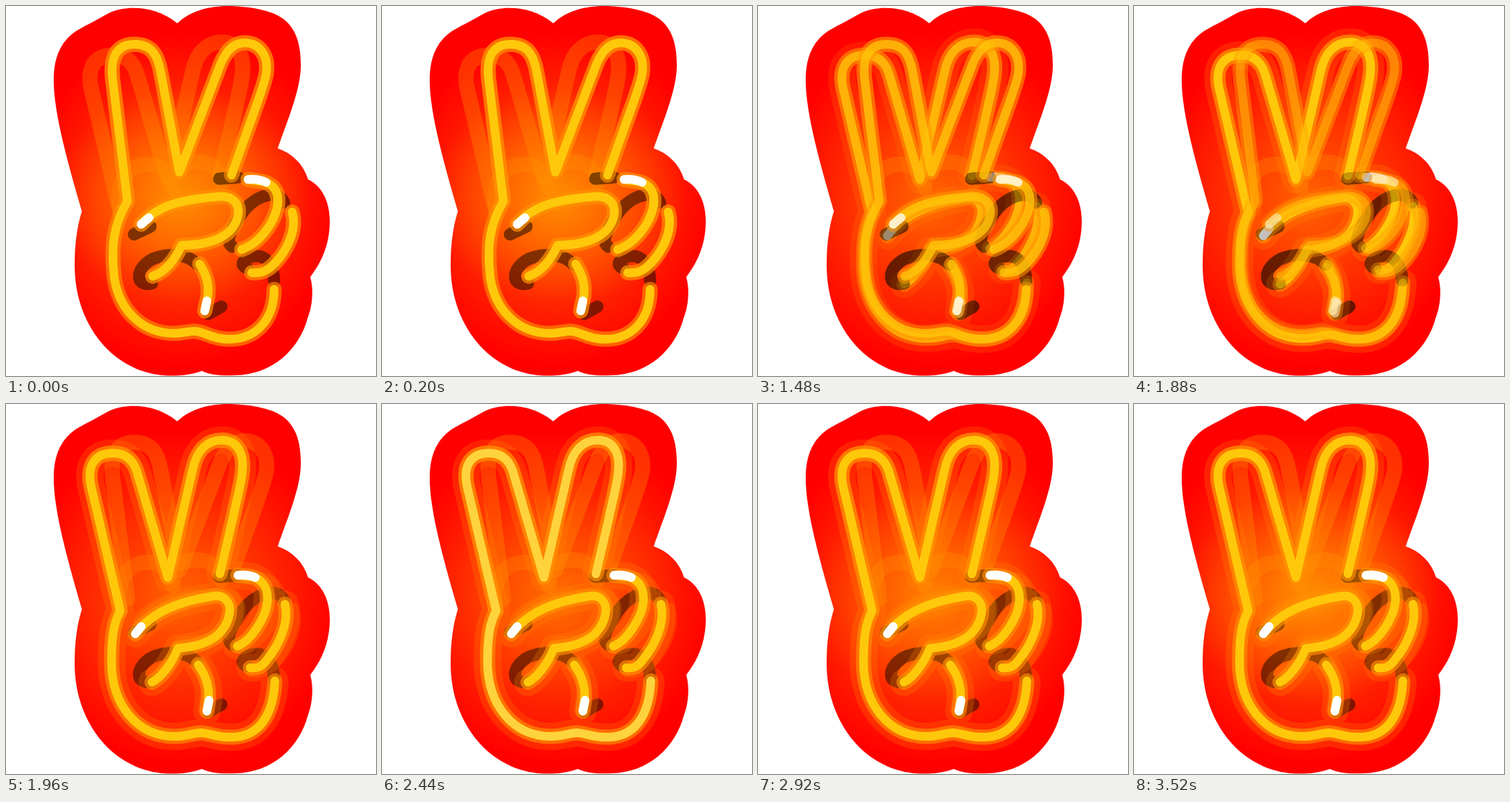
An HTML page with a canvas for the animation above (3600 ms loop, 512x512 px).

```html
<!DOCTYPE html>
<html lang="en">
<head>
<meta charset="utf-8">
<title>Neon hand</title>
<style>
  html, body { margin: 0; width: 100%; height: 100%; overflow: hidden; background: #fff; }
  canvas { display: block; width: 512px; height: 512px; }
</style>
</head>
<body>
<canvas id="stage" width="512" height="512"></canvas>
<script>
const ctx = document.getElementById('stage').getContext('2d');
const LOOP = 3600, STEP = 40;
ctx.lineCap = ctx.lineJoin = 'round';

const join = (...paths) => {
  const all = new Path2D();
  paths.forEach(p => all.addPath(p));
  return all;
};

const glass = new Path2D(`M237 24 C255 7 279 0 310 0 C345 1 371 8 384 18
  C402 32 408 54 408 82 C408 115 390 157 376 197 C396 204 411 218 418 240
  C437 249 448 270 448 298 C448 328 438 353 421 375 C426 391 424 415 418 430
  C406 476 368 510 318 511 C300 512 283 511 271 505 C253 512 227 513 209 510
  C144 500 95 438 95 359 C95 331 98 306 105 284 C87 222 66 149 66 103
  C66 68 78 47 98 34 C114 25 128 18 142 10 C168 -2 208 0 237 24Z`);

// Tubes that stay dark between the lit parts.
const darkTubes = new Path2D(`M295 239 L321 237 M385 272 C374 250 340 265 325 289
  C315 305 302 326 313 333 M371 380 C370 354 357 345 345 346 C332 347 320 358 334 363
  M177 316 L200 305 M202 384 C177 389 179 362 203 350 C226 341 252 343 265 358
  M280 426 L298 416`);

const wideFingers = new Path2D(`M168 270 L148 105 C143 68 155 53 178 53
  C202 53 210 69 214 91 L240 230 L297 80 C306 59 317 51 330 51
  C351 51 364 69 360 94 C357 110 349 130 342 150 L312 234`);
const wide = {
  outline: join(wideFingers, new Path2D(`M371 392 C371 435 345 462 307 461
    C284 461 274 450 261 450 C250 450 246 453 233 453 C188 453 157 421 150 377
    C145 335 148 304 168 270`)),
  details: new Path2D(`M187 302 C211 275 244 268 291 264 C314 261 324 274 321 290
    C316 315 290 331 243 331 C234 351 222 367 203 374
    M268 357 C279 374 282 392 278 408 L275 422
    M335 240 L355 243 C382 249 380 276 367 300 C354 322 340 332 326 337
    M396 285 C403 309 390 338 370 358 C360 368 351 370 340 369`),
  shine: new Path2D('M187 302 L198 293 M278 408 L275 422 M335 240 C344 239 352 240 360 244')
};

const palm = new Path2D(`M372 383 C370 431 350 460 314 461 C292 462 281 455 270 455
  C259 455 251 460 234 460 C180 460 147 415 146 359 C146 321 149 304 158 286`);
const narrowFingers = new Path2D(`M158 286 L118 115 C111 84 124 68 148 68
  C166 68 176 78 181 93 L224 240 L258 92 C264 62 280 50 299 50
  C320 50 330 68 327 94 C325 113 318 138 314 158 L296 235`);
const fistFingers = new Path2D(`M158 286 C150 246 169 219 196 219 C216 219 228 232 231 252
  M240 221 C270 209 295 218 298 244`);
const narrowDetails = new Path2D(`M179 318 C203 287 240 273 286 266 C304 263 312 277 309 291
  C304 317 282 335 238 338 C229 360 215 378 202 385
  M266 361 C277 376 282 394 280 410 L278 425
  M321 237 L341 239 C366 246 367 276 352 302 C341 321 331 331 320 335
  M386 277 C392 302 379 332 361 354 C353 365 346 366 338 365`);
const narrowShine = new Path2D('M179 318 L187 308 M281 410 L278 425 M321 237 C330 236 338 237 345 240');

const narrow = { outline: join(palm, narrowFingers), details: narrowDetails, shine: narrowShine, halo: true };
const fist = {
  outline: join(palm, fistFingers), details: narrowDetails, halo: true,
  shine: join(narrowShine, new Path2D('M230 247 L231 252'))
};
for (const pose of [wide, narrow, fist]) pose.all = join(pose.outline, pose.details);

const clamp = x => Math.max(0, Math.min(1, x));
// Fades in around `from` and out around `to`; neighbours overlap while both stay bright.
const lit = (t, from, to) => clamp((t - from + 100) / 130) * clamp((to + 100 - t) / 130);

function stroke(path, width, color, alpha = 1) {
  ctx.globalAlpha = alpha;
  ctx.lineWidth = width;
  ctx.strokeStyle = color;
  ctx.stroke(path);
}

function drawSpot(x, y, rx, ry, inner, outer, alpha) {
  const fill = ctx.createRadialGradient(0, 0, 0, 0, 0, 1);
  fill.addColorStop(0, inner);
  fill.addColorStop(1, outer);
  ctx.save();
  ctx.globalAlpha = alpha;
  ctx.clip(glass);
  ctx.translate(x, y);
  ctx.scale(rx, ry);
  ctx.fillStyle = fill;
  ctx.fillRect(-3, -3, 6, 6);
  ctx.restore();
}

function drawPose(pose, alpha, flash = 0) {
  if (alpha <= 0) return;
  stroke(darkTubes, 17, '#281000', 0.58 * alpha);
  stroke(wide.details, 20, '#ff9600', 0.2 * alpha);
  if (pose.halo) stroke(pose.all, 38, '#ff8c00', 0.23 * alpha);
  stroke(pose.all, 21, '#ff9100', 0.65 * alpha);
  stroke(pose.details, 12, '#ffc80a', alpha);
  stroke(pose.outline, 12, `rgb(255,${200 + 55 * flash},${10 + 245 * flash})`, alpha);
  stroke(pose.shine, 12, '#fff', alpha);
}

function draw(t) {
  const glow = (1 + Math.cos(2 * Math.PI * t / LOOP)) / 2;
  const flash = 0.5 * clamp(1 - Math.abs(t - 2560) / 200);
  const wideLit = Math.max(lit(t, -400, 360), lit(t, 1480, 1840));
  const narrowLit = Math.max(lit(t, 1080, 1480), lit(t, 1840, 4000));

  ctx.clearRect(0, 0, 512, 512);
  drawSpot(242, 268, 215, 230, 'rgb(255,98,0)', '#f00', 1);
  drawSpot(245, 263, 176, 150, 'rgba(255,170,0,0.6)', 'rgba(255,170,0,0)', glow);
  stroke(fistFingers, 21, '#ff9600', 0.26);
  stroke(narrowFingers, 21, '#ff9600', 0.32);
  stroke(wideFingers, 21, '#ff9600', 0.32);
  drawPose(narrow, narrowLit, flash);
  drawPose(fist, lit(t, 360, 1080));
  drawPose(wide, wideLit);
}

function tick() {
  const t = performance.now() % LOOP;
  draw(Math.min(Math.floor(t / STEP) * STEP, LOOP - 2 * STEP));
  requestAnimationFrame(tick);
}
tick();
</script>
</body>
</html>
```
